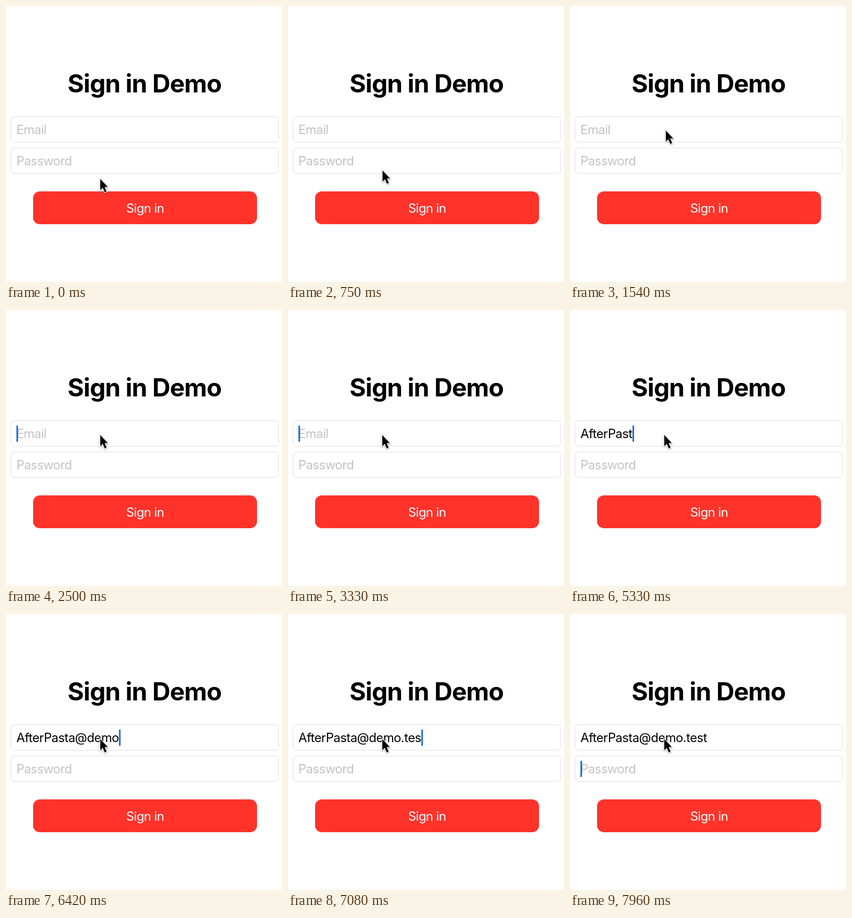
Animation of 530x530 px, one loop 8 s. Source, as an HTML page:

```html
<!DOCTYPE html>
<html lang="en">
<head>
<meta charset="utf-8">
<title>Sign in Demo</title>
<style>
html, body { margin: 0; width: 100%; height: 100%; overflow: hidden; background: #fff; }
body { font: 24px Inter, sans-serif; font-optical-sizing: none; letter-spacing: -.025em; }
h1, .field, .button, #pointer { position: absolute; box-sizing: border-box; margin: 0; }
h1 { left: 0; width: 532px; top: 119px; font-size: 48px; line-height: 60px; letter-spacing: -.02em; text-align: center; }
.field {
  left: 9px; width: 515px; height: 50px; padding: 1px 0 0 10px;
  display: flex; align-items: center; white-space: pre;
  border: 1px solid #dfdfdf; border-radius: 8px;
}
.hint { color: #c3c3c5; }
.caret { flex: none; width: 3px; height: 31px; margin: -1px -3px 0 0; background: #1670e4; z-index: 1; opacity: 0; }
.button {
  left: 52px; top: 356px; width: 430px; height: 63px; line-height: 65px;
  border-radius: 13px; background: #ff332a; color: #fff; text-align: center;
}
#pointer { left: 0; top: 0; overflow: visible; z-index: 2; filter: drop-shadow(0 1.5px 1.5px #0006); }
</style>
</head>
<body>
<h1>Sign in Demo</h1>
<div class="field" style="top:212px"><span id="email"></span><i class="caret"></i><span class="hint" id="emailHint">Email</span></div>
<div class="field" style="top:272px"><i class="caret"></i><span class="hint">Password</span></div>
<div class="button">Sign in</div>
<svg id="pointer" width="18" height="28">
  <path d="M0 0V21.5L4.8 17 8.6 25.8 12.2 24.2 8.4 15.6H14.5Z" stroke="#fff" stroke-width="2.4" paint-order="stroke"/>
</svg>
<script>
const LOOP = 8000, FOCUS_EMAIL = 2040, FOCUS_PASSWORD = 7920;
const ADDRESS = 'AfterPasta@demo.test';
const KEY_TIMES = [
  3880, 4040, 4130, 4290, 4420, 4920, 5040, 5170, 5290, 5420,
  5830, 6040, 6170, 6290, 6380, 6500, 6670, 6920, 7080, 7290
];
// time, x, y
const POINTER = [[540, 181, 332], [1330, 184, 239], [1540, 184, 239], [1630, 181, 240]];

const $ = id => document.getElementById(id);
const email = $('email'), emailHint = $('emailHint'), pointer = $('pointer');
const [emailCaret, passwordCaret] = document.querySelectorAll('.caret');
const clamp = v => Math.min(1, Math.max(0, v));
const smooth = v => v * v * (3 - 2 * v);

function pointerAt(t) {
  let [, x, y] = POINTER[0];
  for (let i = 1; i < POINTER.length; i++) {
    const [start, x0, y0] = POINTER[i - 1], [end, x1, y1] = POINTER[i];
    const k = smooth(clamp((t - start) / (end - start)));
    x += (x1 - x0) * k;
    y += (y1 - y0) * k;
  }
  return [x, y];
}

// Solid for 0.7 s, fades out, then fades back in at the end of each second.
function blink(age) {
  const p = age % 1000;
  return 1 - clamp((p - 700) / 140) + (age > 1000 ? clamp(p / 120) - 1 : 0);
}

function emailCaretAlpha(t, typed) {
  if (t < FOCUS_EMAIL || t >= FOCUS_PASSWORD) return 0;
  return typed ? 1 : clamp(blink(t - FOCUS_EMAIL));
}

function draw(now) {
  const t = now % LOOP;
  const typed = KEY_TIMES.filter(key => key <= t).length;
  const [x, y] = pointerAt(t);
  email.textContent = ADDRESS.slice(0, typed);
  emailHint.hidden = typed > 0;
  emailCaret.style.opacity = emailCaretAlpha(t, typed);
  passwordCaret.style.opacity = +(t >= FOCUS_PASSWORD);
  pointer.style.transform = `translate(${x}px, ${y}px)`;
  requestAnimationFrame(() => draw(performance.now()));
}
draw(0);
</script>
</body>
</html>
```
